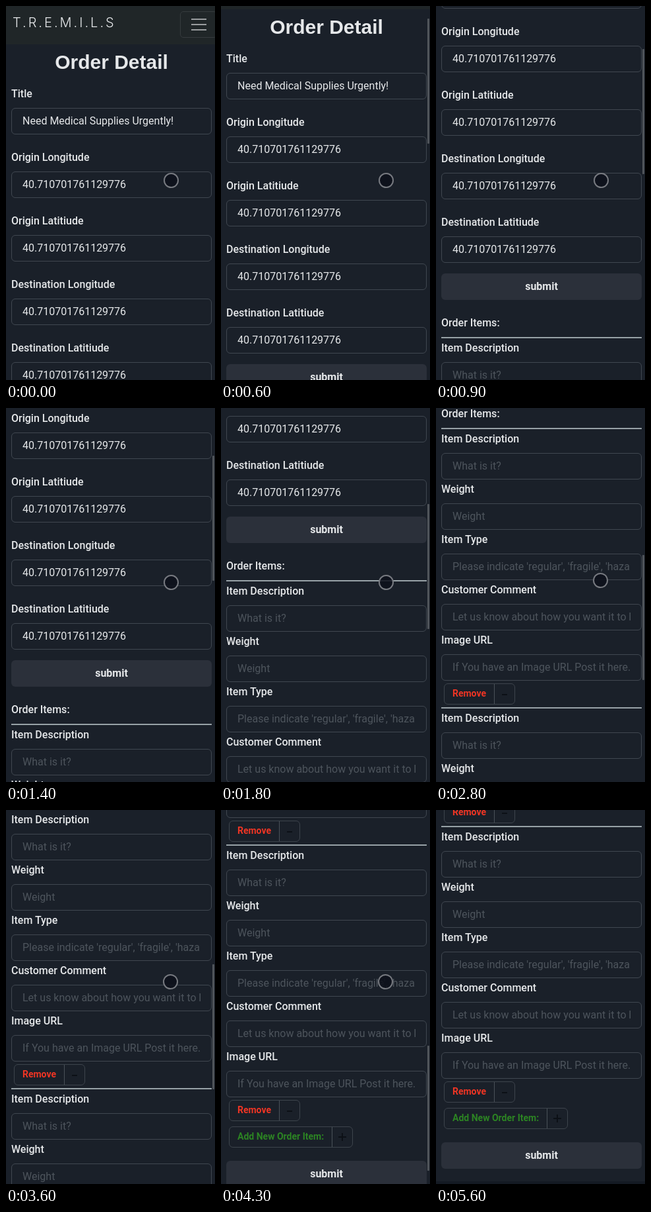
An HTML page for the animation above (6700 ms loop, 317 px wide and 565 px high).

```html
<!DOCTYPE html>
<html lang="en">
<head>
<meta charset="utf-8">
<title>Order Detail</title>
<style>
  html, body { margin: 0; width: 100%; height: 100%; overflow: hidden; background: #1a2029; }
  #stage { position: relative; width: 317px; height: 565px; overflow: hidden; background: #1a2029;
    font: 16px/24px Roboto, sans-serif; color: #e6e8ea; }
  #stage * { position: absolute; box-sizing: border-box; margin: 0; white-space: pre; }
  #page { left: 0; top: 0; width: 317px; height: 1653px; }
  #nav { left: 0; top: 0; width: 317px; height: 58px; background: #202628; }
  .brand { left: 10px; top: 10px; font: 300 20px/30px Inter, sans-serif; letter-spacing: 3px; }
  .toggler { left: 264px; top: 8px; width: 56px; height: 40px; border: 1px solid #363b3e; border-radius: 5px; }
  .toggler i { left: 16px; width: 23px; height: 2px; background: #999c9e; }
  h1 { left: 8px; top: 65px; width: 304px; text-align: center; font: bold 30px/40px "Liberation Sans", Arial, sans-serif; }
  .label { left: 8px; font-weight: 500; }
  .input { left: 8px; width: 304px; height: 40px; border: 1px solid #404750; border-radius: 6px; }
  .input span { left: 16px; top: 0; width: 270px; height: 38px; line-height: 37px; overflow: hidden; }
  .hint span { color: #4d545c; }
  .submit { left: 8px; width: 304px; height: 40px; border-radius: 6px; background: #2b303a;
    text-align: center; font-weight: 700; line-height: 39px; }
  .rule { left: 8px; width: 304px; height: 2px; background: #97a1a6; }
  .action { left: 12px; height: 32px; border: 1px solid #3d444c; border-radius: 6px; font: 700 14px/29px Roboto, sans-serif; }
  .action span { left: 12px; top: 0; }
  .action b { right: 30px; top: 0; width: 1px; height: 30px; background: #4a5159; }
  .action i { background: #0c1016; }
  .remove { width: 108px; color: #ef3524; }
  .add { width: 188px; color: #2c8423; }
  .remove i { right: 11px; top: 15px; width: 8px; height: 2px; }
  .add i { right: 9px; top: 14px; width: 12px; height: 2px; }
  .add i + i { right: 14px; top: 9px; width: 2px; height: 12px; }
  .foot { left: 0; top: 1649px; width: 317px; height: 4px; background: #141a23; }
  #thumb { left: 313px; top: 0; width: 3px; height: 189px; border-radius: 1px; background: #50555b; }
  #touch { left: 0; top: 0; width: 23px; height: 23px; border-radius: 50%; border: 2px solid #777a80; background: rgba(13, 16, 26, .87); }
</style>
</head>
<body>
<div id="stage">
  <div id="page">
    <div id="nav">
      <div class="brand">T.R.E.M.I.L.S</div>
      <div class="toggler"><i style="top:10px"></i><i style="top:18px"></i><i style="top:26px"></i></div>
    </div>
    <h1>Order Detail</h1>
    <div class="foot"></div>
  </div>
  <div id="thumb"></div>
  <div id="touch"></div>
</div>
<script>
  const $ = id => document.getElementById(id);
  const page = $('page'), thumb = $('thumb'), touch = $('touch');

  const add = (kind, y, html = '') =>
    page.insertAdjacentHTML('beforeend', `<div class="${kind}" style="top:${y}px">${html}</div>`);

  function field(y, label, text, kind = 'input', gap = 21) {
    add('label', y - 12, label);
    add(kind, y + gap, `<span>${text}</span>`);
  }

  function orderItem(y) {
    add('rule', y);
    const hints = [
      ['Item Description', 'What is it?'],
      ['Weight', 'Weight'],
      ['Item Type', "Please indicate 'regular', 'fragile', 'hazardous'"],
      ['Customer Comment', 'Let us know about how you want it to be delivered'],
      ['Image URL', 'If You have an Image URL Post it here.']
    ];
    hints.forEach(([label, hint], i) => field(y + 17 + 76 * i, label, hint, 'input hint'));
    add('action remove', y + 386, '<span>Remove</span><b></b><i></i>');
  }

  field(133, 'Title', 'Need Medical Supplies Urgently!');
  ['Origin Longitude', 'Origin Latitiude', 'Destination Longitude', 'Destination Latitiude']
    .forEach((label, i) => field(229 + 96 * i, label, '40.710701761129776'));
  add('submit', 594, 'submit');
  add('label', 657, 'Order Items:');
  orderItem(690);
  orderItem(1112);
  add('action add', 1538, '<span>Add New Order Item:</span><b></b><i></i><i></i>');
  add('submit', 1590, 'submit');

  // Wheel bursts: start time, then the scroll offset at each 100 ms tick.
  const LOOP = 6700, TICK = 100;
  const bursts = [
    [0, 0],
    [400, 3, 20, 53, 100, 150, 190, 210],
    [1200, 212],
    [1400, 213, 235, 290, 360, 430, 478],
    [2200, 484, 512, 548, 584],
    [2700, 605, 660, 692],
    [3600, 692, 765, 848],
    [4000, 862, 930, 1015, 1060],
    [4800, 1066, 1080, 1088]
  ];

  function scrollAt(time) {
    const [start, ...offsets] = bursts.findLast(burst => burst[0] <= time);
    return offsets[Math.min(Math.floor((time - start) / TICK), offsets.length - 1)];
  }

  function draw(now) {
    const time = Math.floor(now % LOOP / TICK) * TICK;
    const y = scrollAt(time);
    const fade = Math.min(1, Math.max(0, (5600 - time) / 400));
    const [tx, ty] = time < 2200 ? [239, 252] : time < 3400 ? [238, 249] : [238, 248];
    page.style.transform = `translateY(${-y}px)`;
    thumb.style.transform = `translateY(${Math.round(1 + y * .335)}px)`;
    thumb.style.opacity = time < 400 ? 0 : time >= 3400 && time < 3600 ? .5 : fade;
    touch.style.transform = `translate(${tx}px, ${ty}px)`;
    touch.style.opacity = fade;
  }

  const begin = performance.now();
  function frame() {
    draw(performance.now() - begin);
    requestAnimationFrame(frame);
  }
  frame();
</script>
</body>
</html>
```
